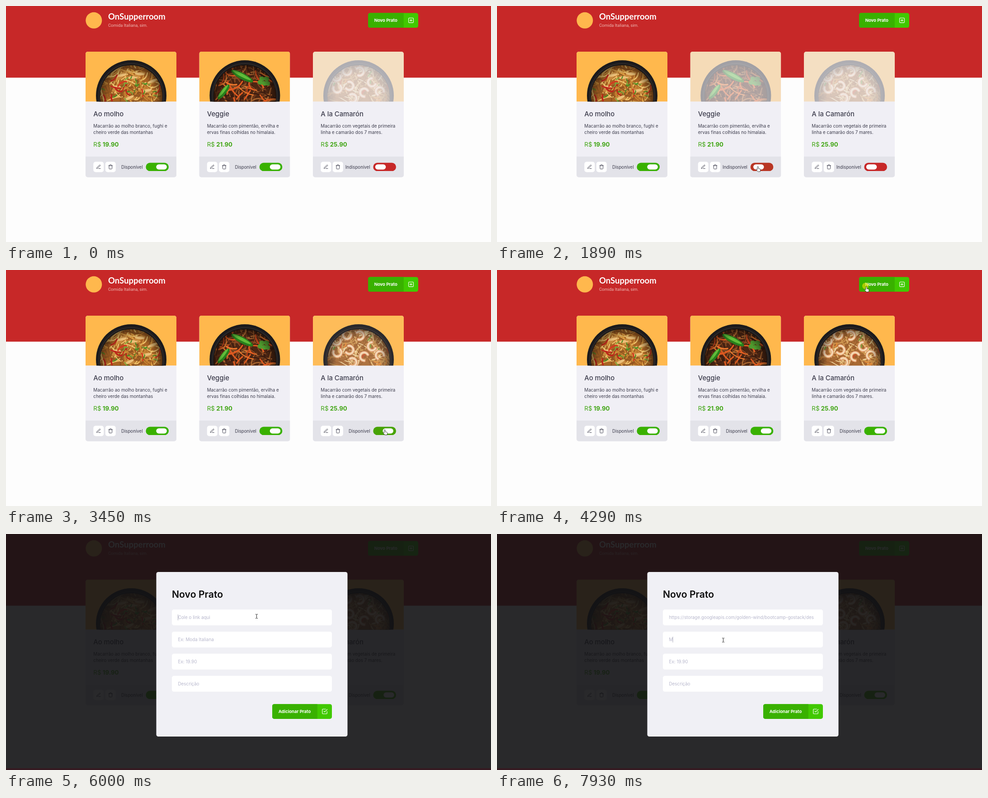
These frames come from a looping animation (1073x522 px, 8 s). An HTML page:

```html
<!DOCTYPE html>
<html lang="pt">
<head>
<meta charset="utf-8">
<title>Novo Prato</title>
<style>
html, body { margin: 0; width: 100%; height: 100%; overflow: hidden; background: #fdfdfd; }
svg { display: block; width: 100%; height: 100%; font-family: Inter, sans-serif; }
.icon { fill: none; stroke-width: 2; stroke-linecap: round; stroke-linejoin: round; }
</style>
</head>
<body>
<svg id="stage" viewBox="0 0 1073 522"></svg>
<script>
const LOOP = 8000, GREEN = [57, 177, 0], RED = [199, 40, 40];
const $ = id => document.getElementById(id);

let seed = 7;
const rnd = (a, b) => {
  seed = (seed * 16807) % 2147483647;
  return a + (b - a) * seed / 2147483647;
};
const pick = list => list[Math.floor(rnd(0, list.length))];

const box = (x, y, w, h, fill, r = 0, more = '') =>
  `<rect x="${x}" y="${y}" width="${w}" height="${h}" rx="${r}" fill="${fill}" ${more}/>`;
const text = (x, y, size, fill, str, weight = 400, more = '') =>
  `<text x="${x}" y="${y}" font-size="${size}" fill="${fill}" font-weight="${weight}" ${more}>${str}</text>`;
const icon = (cx, cy, scale, color, d) =>
  `<path class="icon" stroke="${color}" d="${d}" transform="translate(${cx} ${cy}) scale(${scale}) translate(-12 -12)"/>`;
const leaf = (x, y, rx, ry, turn, fill) =>
  `<ellipse rx="${rx}" ry="${ry}" fill="${fill}" transform="translate(${x} ${y}) rotate(${turn})"/>`;

const PEN = 'M12 20h9M16.5 3.5a2.1 2.1 0 0 1 3 3L7 19l-4 1 1-4z';
const BIN = 'M3 6h18M19 6v14a2 2 0 0 1-2 2H7a2 2 0 0 1-2-2V6M8 6V4a2 2 0 0 1 2-2h4a2 2 0 0 1 2 2v2';
const PLUS = 'M5 3h14a2 2 0 0 1 2 2v14a2 2 0 0 1-2 2H5a2 2 0 0 1-2-2V5a2 2 0 0 1 2-2zM12 8v8M8 12h8';
const CHECK = 'M9 11l3 3L22 4M21 12v7a2 2 0 0 1-2 2H5a2 2 0 0 1-2-2V5a2 2 0 0 1 2-2h11';

// Curved strands scattered over the bowl, in card coordinates
function strands(count, colors, width, length) {
  let out = '';
  for (let i = 0; i < count; i++) {
    const x = rnd(34, 168), y = rnd(28, 112), a = rnd(0, 6.3), l = rnd(.6, 1.2) * length;
    const dx = Math.cos(a) * l, dy = Math.sin(a) * l, bend = rnd(-.5, .5);
    out += `<path d="M${x - dx / 2} ${y - dy / 2}q${dx / 2 - dy * bend} ${dy / 2 + dx * bend} ${dx} ${dy}"
      fill="none" stroke="${pick(colors)}" stroke-width="${rnd(.7, 1.2) * width}" stroke-linecap="round"/>`;
  }
  return out;
}

function chunks() {
  const spots = [[80, 53], [105, 58], [120, 50], [68, 79], [136, 87], [148, 66], [97, 103]];
  return spots.map(([x, y]) => leaf(x, y, 13, 4.5, rnd(-50, 30), '#c88a3e') +
    leaf(x, y - 1, 11, 3, rnd(-30, 10), '#ecc078')).join('') +
    strands(13, ['#bd241a', '#d33a20'], 3, 18) + strands(22, ['#4f8c24', '#7aa63a'], 2.4, 8);
}
function peppers() {
  const pod = (x, y, l, w, a) => leaf(x, y, l, w, a, '#277f1c') +
    leaf(x - 1, y - 2, l * .85, w * .5, a, '#61bd3a');
  return strands(28, ['#df5a20', '#e8762c', '#c4431a'], 3, 30) +
    pod(95, 54, 27, 7, 28) + pod(54, 89, 20, 6, -52) +
    [[139, 60], [149, 60], [144, 70], [135, 68], [151, 70]].map(([x, y]) => leaf(x, y, 6, 5, 20, '#4f9a2e')).join('');
}
function shrimps() {
  const spots = [[52, 56], [75, 43], [104, 44], [54, 82], [81, 76], [130, 68], [113, 90], [148, 87], [88, 103]];
  return strands(20, ['#c5502a', '#7c9a3a', '#df8a3a'], 3, 13) + spots.map(([x, y]) => {
    const spin = `transform="translate(${x} ${y}) rotate(${rnd(0, 360)})" fill="none" stroke-linecap="round"`;
    return `<path d="M-9 3A9 9 0 1 1 6 7" stroke="#dc9161" stroke-width="7" ${spin}/>
      <path d="M-9 3A9 9 0 1 1 6 7" stroke="#f5d8b2" stroke-width="4" ${spin}/>`;
  }).join('');
}

const dishes = [
  { x: 176, name: 'Ao molho', price: '19.90', base: '#a96424', tones: ['#dfa044', '#c78432', '#edc06a', '#8f5420'], extra: chunks,
    lines: ['Macarrão ao molho branco, fughi e', 'cheiro verde das montanhas'] },
  { x: 427.4, name: 'Veggie', price: '21.90', base: '#4c2613', tones: ['#8b4b22', '#6b3518', '#a9652f', '#3d1c10'], extra: peppers,
    lines: ['Macarrão com pimentão, ervilha e', 'ervas finas colhidas no himalaia.'] },
  { x: 679, name: 'A la Camarón', price: '25.90', base: '#a86a34', tones: ['#e6bb76', '#cf9850', '#f0d39c', '#9c602e'], extra: shrimps,
    lines: ['Macarrão com vegetais de primeira', 'linha e camarão dos 7 mares.'] }
];

const card = (d, i) => `<g transform="translate(${d.x} 101)"><g clip-path="url(#card)">
  ${box(0, 0, 201, 278, '#f0eff5')}
  <g id="photo${i}" clip-path="url(#photo)">
    ${box(0, 0, 201, 110.5, '#ffb84d')}
    <circle cx="101" cy="97" r="78" fill="#1b1a1c"/><circle cx="101" cy="98" r="73" fill="#2a2626"/>
    <g clip-path="url(#bowl)">${box(20, 20, 162, 92, d.base)}${strands(130, d.tones, 2.4, 32)}${d.extra()}</g>
    <circle cx="101" cy="98" r="70" fill="url(#shade)"/>
  </g>
  ${box(0, 232, 201, 46, '#e3e3e9')}</g>
  ${text(17.3, 143, 14.8, '#3d3d4d', d.name, 500)}
  ${d.lines.map((s, k) => text(17.3, 168 + k * 14.3, 9.85, '#3d3d4d', s)).join('')}
  ${text(17.3, 209.7, 13.4, '#3fa512', 'R$')}${text(37.8, 209.7, 13.2, '#3fa512', d.price, 700)}
  ${box(17.3, 243.5, 23, 23, '#fff', 5)}${icon(28.8, 254.8, .47, '#3d3d4d', PEN)}
  ${box(43.8, 243.5, 23, 23, '#fff', 5)}${icon(55.3, 254.8, .47, '#3d3d4d', BIN)}
  ${text(126.5, 258.6, 9.7, '#3d3d4d', '', 400, `id="label${i}" text-anchor="end"`)}
  ${box(133.3, 245.7, 50.7, 18.4, '#39b100', 9.2, `id="track${i}"`)}
  ${box(156.3, 249.2, 23.5, 11.5, '#fff', 5.75, `id="knob${i}"`)}
</g>`;

const button = (x, y, w, label, glyph) => box(x, y, w, 32.7, '#41c900', 4.5) +
  `<path d="M${x + 4.5} ${y}h${w - 36.7}v32.7h${32.2 - w + 4.5}a4.5 4.5 0 0 1-4.5-4.5v-23.7a4.5 4.5 0 0 1 4.5-4.5z" fill="#39b100"/>` +
  text(x + 13.7, y + 19.9, 9.5, '#fff', label, 700) + icon(x + w - 16, y + 16.3, .58, '#fff', glyph);

const hints = ['Cole o link aqui', 'Ex: Moda Italiana', 'Ex: 19.90', 'Descrição'];
const LINK = 'https://storage.googleapis.com/golden-wind/bootcamp-gostack/des';

$('stage').innerHTML = `
<defs>
  <clipPath id="card"><rect width="201" height="277.7" rx="5"/></clipPath>
  <clipPath id="photo"><rect width="201" height="110.5"/></clipPath>
  <clipPath id="bowl"><circle cx="101" cy="99" r="69"/></clipPath>
  <radialGradient id="shade"><stop offset=".7" stop-opacity="0"/><stop offset="1" stop-opacity=".5"/></radialGradient>
</defs>
${box(0, 0, 1073, 522, '#fdfdfd')}${box(0, 0, 1073, 158.5, '#c72828')}
<circle cx="194.3" cy="31.8" r="18" fill="#ffb84d"/>
${text(226, 29.8, 18.5, '#fff', 'OnSupperroom', 700, 'font-family="Lato, sans-serif"')}
${text(226, 46, 9.4, '#eeb9b4', 'Comida Italiana, sim.', 400, 'font-family="Roboto, sans-serif"')}
${button(801, 15.4, 111, 'Novo Prato', PLUS)}
${dishes.map(card).join('')}
<g id="modal">
  ${box(0, 0, 1073, 522, '#121214', 0, 'opacity=".9"')}${box(0, 518, 1073, 4, '#351a21')}
  ${box(332.5, 84, 423, 364, '#f0f0f5', 4.5)}
  ${text(367, 140.8, 21.2, '#0c0c0c', 'Novo Prato', 600)}
  ${hints.map((s, i) => box(367, 167 + i * 48.9, 354, 35, '#fff', 4.5) +
    text(380.5, 188.2 + i * 48.9, 9.85, '#b7b7cc', s, 400, `id="field${i}"`)).join('')}
  ${button(589, 376.2, 132, 'Adicionar Prato', CHECK)}
  ${box(0, 0, 1, 13, '#b0b0c0', 0, 'id="caret"')}
</g>
<circle id="press" cx="815" cy="35.3" r="7" fill="#ffe600" opacity=".55"/>
<g id="cursor" stroke="#222" stroke-width=".8" stroke-linejoin="round" fill="#fff">
  <path id="arrow" d="M0 0v9.6l2.2-2 1.5 3.4 1.7-.7-1.5-3.4h3z"/>
  <path id="hand" d="M-1 1.2a1.2 1.2 0 0 1 2.4 0V4.6l3.4.7q1.4.4 1.2 1.8l-.8 4.4H.4l-3.8-4.3q-.6-1 .5-1.4.8-.1 1.9 1z"/>
  <path id="beam" fill="none" stroke-width="1" d="M-2.5-4.5h2M.5-4.5h2M0-4v8M-2.5 4.5h2M.5 4.5h2"/>
</g>`;

// Cursor stops: time, x, y
const path = [
  [115, 1050, 512], [190, 1015, 499], [500, 476, 361], [820, 476, 361], [1080, 560, 343], [1250, 652, 353],
  [1490, 577, 355], [2590, 577, 355], [2740, 617.7, 356], [3050, 838, 356], [3420, 838, 356],
  [3990, 819, 49], [4210, 817, 37], [4360, 817, 37], [4370, 815.7, 36], [4610, 815.7, 36],
  [5060, 559, 171], [5310, 559, 171], [5610, 554.5, 182], [6390, 554.5, 182], [6850, 502, 249],
  [6940, 502, 249], [7230, 500.5, 234.7], [LOOP, 500.5, 234.7]
];
const within = (t, ...spans) => spans.some(([a, b]) => t >= a && t < b);
const show = (id, on) => $(id).style.display = on ? '' : 'none';

function cursorAt(t) {
  const k = Math.max(1, path.findIndex(p => p[0] > t));
  const [t0, x0, y0] = path[k - 1], [t1, x1, y1] = path[k];
  const u = Math.max(0, (t - t0) / (t1 - t0)), e = u * u * (3 - 2 * u);
  return [x0 + (x1 - x0) * e, y0 + (y1 - y0) * e];
}

// Each click flips the switch, which settles exponentially
function switchAt(t, start, clicks) {
  const past = clicks.filter(c => t >= c);
  const on = past.length % 2 ? !start : start;
  const left = past.length ? Math.exp((past.at(-1) - t) / 100) : 0;
  return { on, level: on ? 1 - left : left };
}

function setSwitch(i, { on, level }) {
  $('photo' + i).setAttribute('opacity', .3 + .7 * level);
  $('label' + i).textContent = on ? 'Disponível' : 'Indisponível';
  $('knob' + i).setAttribute('x', 137.8 + 18.5 * level);
  $('track' + i).setAttribute('fill', `rgb(${RED.map((c, k) => Math.round(c + (GREEN[k] - c) * level))})`);
}

function draw() {
  const t = performance.now() % LOOP;
  setSwitch(0, switchAt(t, true, []));
  setSwitch(1, switchAt(t, true, [1660, 2540]));
  setSwitch(2, switchAt(t, false, [3220]));
  show('modal', t >= 4370);
  show('press', within(t, [4210, 4370]));

  const pasted = t >= 6460, typed = t >= 7930, second = t >= 7000;
  $('field0').textContent = pasted ? LINK : hints[0];
  $('field1').textContent = typed ? 'M' : hints[1];
  show('caret', within(t, [5760, 6850], [7000, 7700], [7930, LOOP]));
  $('caret').setAttribute('x', typed ? 388.5 : pasted && !second ? 706.5 : 380);
  $('caret').setAttribute('y', second ? 227 : 178);

  const [x, y] = cursorAt(t);
  const beam = t >= 4960;
  const hand = within(t, [470, 950], [1400, 2640], [2990, 3520], [4060, 4370]);
  $('cursor').setAttribute('transform', `translate(${x} ${y})`);
  show('cursor', t >= 190);
  show('beam', beam);
  show('hand', hand);
  show('arrow', !beam && !hand);
  requestAnimationFrame(draw);
}
draw();
</script>
</body>
</html>
```
